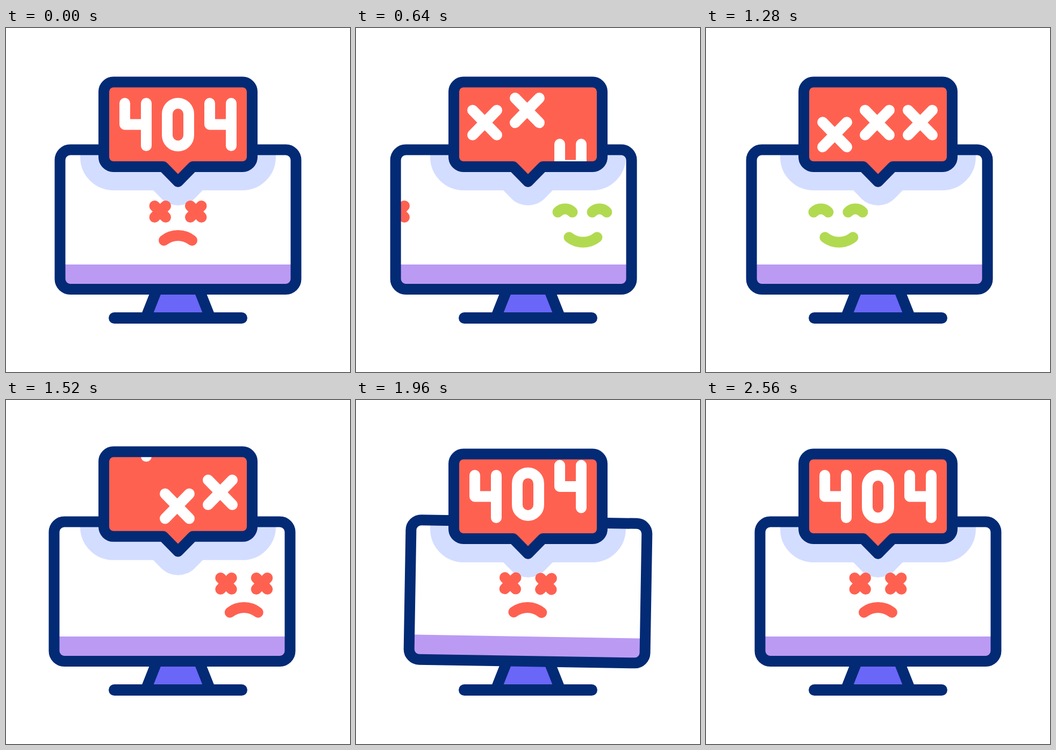
Animation, 640 px wide and 640 px high, one loop 2.68 s. Source, as an HTML page:

```html
<!DOCTYPE html>
<html lang="en">
<head>
<meta charset="utf-8">
<title>404 monitor</title>
<style>
  html, body { margin: 0; width: 100%; height: 100%; overflow: hidden; background: #fff; }
  svg { display: block; width: 100vw; height: 100vh; }
  .line { fill: none; stroke-width: 20; stroke-linecap: round; stroke-linejoin: round; }
  .navy { stroke: #032a75; }
  .coral { stroke: #ff6151; }
  .green { stroke: #b1da51; }
  .white { stroke: #fff; }
</style>
</head>
<body>
<svg viewBox="0 0 640 640">
  <defs>
    <path id="bubble" d="M200 100.5H440A18 18 0 0 1 458 118.5V240A18 18 0 0 1 440 258H347.5L320 286L292.5 258H200A18 18 0 0 1 182 240V118.5A18 18 0 0 1 200 100.5Z"/>
    <rect id="frame" x="100.5" y="226.5" width="439" height="259.5" rx="19"/>
    <path id="four" d="M221 140V179.5H261M261 140V219"/>
    <path id="cross" d="M-22.5 -23L22.5 23M22.5 -23L-22.5 23"/>
    <path id="deadEye" d="M276.5 331L297 352M297 331L276.5 352"/>
    <path id="gladEye" d="M273 342.5A18.2 18.2 0 0 1 300 342.5"/>
    <clipPath id="screenClip"><use href="#frame" data-move="monitor"/></clipPath>
    <clipPath id="bubbleClip"><use href="#bubble"/></clipPath>
  </defs>

  <path d="M281 486L260 539H380L359 486Z" fill="#6a66f8"/>
  <path class="line navy" style="stroke-linecap:butt" d="M281 486L260 539M359 486L380 539"/>
  <path class="line navy" d="M201.5 539.5H438.5" style="stroke-width:21"/>

  <g clip-path="url(#screenClip)">
    <g data-move="monitor">
      <use href="#frame" fill="#fff"/>
      <rect x="90" y="440" width="460" height="56" fill="#bb9af3"/>
    </g>
    <g data-move="bubble">
      <use href="#bubble" fill="#d3ddff" stroke="#d3ddff" stroke-width="88" stroke-linejoin="round"/>
    </g>
    <g data-move="monitor">
      <g id="sad" class="line coral">
        <use href="#deadEye"/>
        <use href="#deadEye" x="66.5"/>
        <path d="M294 395A42 42 0 0 1 346 395"/>
      </g>
      <g id="glad" class="line green">
        <use href="#gladEye"/>
        <use href="#gladEye" x="64"/>
        <path d="M294 389.5A42 42 0 0 0 346 389.5"/>
      </g>
    </g>
  </g>
  <use href="#frame" class="line navy" data-move="monitor"/>

  <g data-move="bubble">
    <use href="#bubble" fill="#ff6151"/>
    <g clip-path="url(#bubbleClip)" class="line white">
      <g class="digit"><use href="#four"/></g>
      <g class="digit"><rect x="300" y="140" width="40" height="79.5" rx="20"/></g>
      <g class="digit"><use href="#four" x="158"/></g>
      <g class="cross"><use href="#cross" x="239.5" y="176"/></g>
      <g class="cross"><use href="#cross" x="318.5" y="176"/></g>
      <g class="cross"><use href="#cross" x="398.5" y="176"/></g>
    </g>
    <use href="#bubble" class="line navy"/>
  </g>
</svg>
<script>
const LOOP = 2680, STEP = 40;
const all = q => [...document.querySelectorAll(q)];
const monitorParts = all('[data-move=monitor]');
const bubbleParts = all('[data-move=bubble]');
const digits = all('.digit'), crosses = all('.cross');
const sad = document.getElementById('sad'), glad = document.getElementById('glad');

// Eased progress from 0 to 1 between two times
function ease(t, from, to) {
  const x = Math.min(1, Math.max(0, (t - from) / (to - from)));
  return x * x * (3 - 2 * x);
}

// Keys are [time, value] pairs in order
function track(t, keys) {
  let value = keys[0][1];
  for (let i = 1; i < keys.length; i++)
    value += (keys[i][1] - keys[i - 1][1]) * ease(t, keys[i - 1][0], keys[i][0]);
  return value;
}

const shiftKeys = [[0, 0], [320, 20.2], [650, -27], [950, 0], [1130, 0], [1360, -22], [1680, 0]];
const hopKeys = [[240, 0], [430, -10], [600, 0], [1440, 0], [1620, -10], [1800, 0]];
const swapIn = [[0, 590], [199, 757], [400, 972]];
const swapBack = [[1130, 1852], [1378, 2011], [1550, 2042]];
const WOBBLE = [1720, 2560], TILT = 2.2;

const move = (el, x, y) => el.setAttribute('transform', `translate(${x} ${y})`);

function draw(t) {
  const shift = track(t, shiftKeys);
  const [a, b] = WOBBLE;
  const tilt = t > a && t < b ? -TILT * Math.sin(4 * Math.PI * (t - a) / (b - a)) : 0;
  for (const el of monitorParts)
    el.setAttribute('transform', `translate(${shift} 0) rotate(${tilt} 320 356)`);

  const hop = track(t, hopKeys);
  for (const el of bubbleParts) move(el, 0, hop);

  const slide = track(t, [[0, 0], [320, 20], [838, -376]]);
  const back = ease(t, 1130, 1780);
  const returning = t >= 1130;
  move(sad, returning ? 380 * (1 - back) : slide, 0);
  move(glad, returning ? -420 * back : slide + 376, 0);

  for (let i = 0; i < 3; i++) {
    const p = ease(t, ...swapIn[i]), q = ease(t, ...swapBack[i]);
    move(digits[i], 0, q > 0 ? -250 * (1 - q) : 200 * p);
    move(crosses[i], 0, q > 0 ? 200 * q : -200 * (1 - p));
  }
}

let start;
function tick(now) {
  start ??= now;
  const t = (now - start) % LOOP;
  draw(Math.floor(t / STEP) * STEP);
  requestAnimationFrame(tick);
}
draw(0);
requestAnimationFrame(tick);
</script>
</body>
</html>
```
